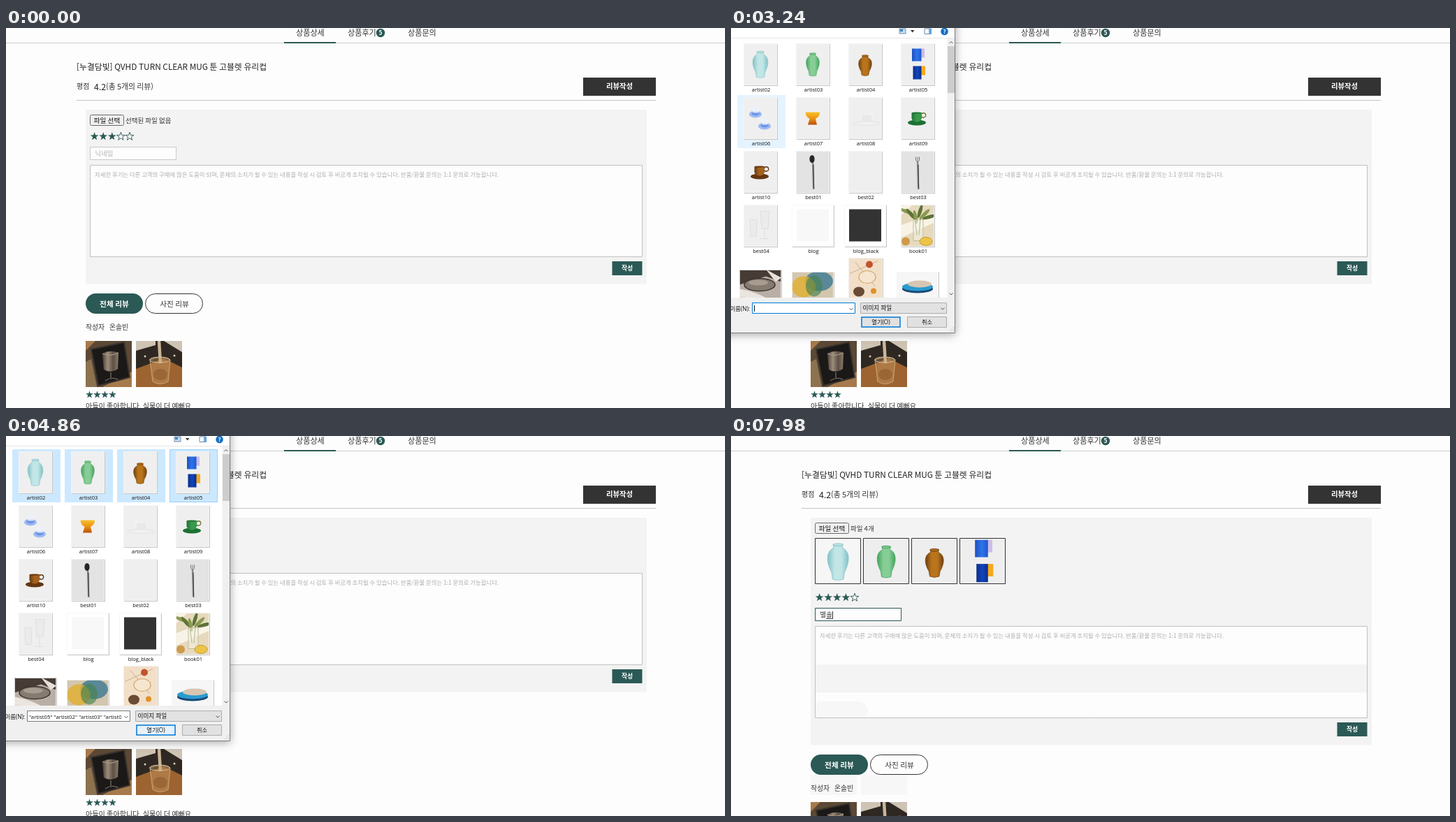
These frames come from a looping animation (1029x544 px, 8000 ms). An HTML page with a canvas:

```html
<!DOCTYPE html>
<html lang="ko">
<head>
<meta charset="utf-8">
<style>
  html, body { margin: 0; width: 100%; height: 100%; overflow: hidden; background: #fdfdfd; }
  canvas { display: block; }
</style>
</head>
<body>
<canvas id="stage" width="1029" height="544"></canvas>
<script>
const LOOP = 8000, W = 1029, H = 544;
const GREEN = '#2b5955', INK = '#333', PAGE = '#fdfdfd';
const UI = '"Open Sans", "Noto Sans CJK KR", sans-serif';
const BODY = '"Noto Sans CJK KR", "Noto Sans CJK", sans-serif';

const stage = document.getElementById('stage').getContext('2d');
const layerCanvas = Object.assign(document.createElement('canvas'), { width: 360, height: 480 });
const layer = layerCanvas.getContext('2d');
let g = stage;

// Value of the last [time, value] step that has been reached.
const step = (t, steps) => steps.reduce((v, [at, next]) => t >= at ? next : v, steps[0][1]);

function box(x, y, w, h, fill, stroke, r = 0, lw = 1) {
  g.beginPath();
  g.roundRect(x, y, w, h, r);
  paint(fill, stroke, lw);
}
function oval(x, y, rx, ry, fill, stroke, lw = 1, turn = 0) {
  g.beginPath();
  g.ellipse(x, y, rx, ry, turn, 0, 7);
  paint(fill, stroke, lw);
}
function paint(fill, stroke, lw) {
  if (fill) { g.fillStyle = fill; g.fill(); }
  if (stroke) { g.strokeStyle = stroke; g.lineWidth = lw; g.stroke(); }
}
function shape(d, fill, stroke, lw = 1) {
  const p = new Path2D(d);
  if (fill) { g.fillStyle = fill; g.fill(p); }
  if (stroke) { g.strokeStyle = stroke; g.lineWidth = lw; g.stroke(p); }
}
function blend(x1, y1, x2, y2, ...colors) {
  const fill = g.createLinearGradient(x1, y1, x2, y2);
  colors.forEach((c, i) => fill.addColorStop(i / (colors.length - 1), c));
  return fill;
}
function text(s, x, y, size, color = INK, weight = 400, align = 'left', family = BODY) {
  g.font = `${weight} ${size}px ${family}`;
  g.textAlign = align;
  g.fillStyle = color;
  g.fillText(s, x, y + size * .37);
}
const ui = (s, x, y, size = 8.2, align = 'left', color = '#111') => text(s, x, y, size, color, 400, align, UI);

function within(x, y, w, h, draw) {
  g.save();
  g.beginPath();
  g.rect(x, y, w, h);
  g.clip();
  draw();
  g.restore();
}
function at(x, y, scale, draw) {
  g.save();
  g.translate(x, y);
  g.scale(scale, scale);
  draw();
  g.restore();
}
function stars(x, y, pitch, radius, full, total) {
  for (let i = 0; i < total; i++) {
    g.beginPath();
    for (let k = 0; k < 10; k++) {
      const r = k % 2 ? radius * .4 : radius, a = k * Math.PI / 5;
      g.lineTo(x + i * pitch + r * Math.sin(a), y - r * Math.cos(a));
    }
    g.closePath();
    paint(i < full && GREEN, i >= full && GREEN, .9);
  }
}

// Pictures, drawn around their own centre.
function vase(halfWidth, top, bottom, light, dark) {
  const h = bottom - top, w = halfWidth, n = w * .45;
  shape(`M${-n},${top} H${n} V${top + h * .1} C${w * 1.25},${top + h * .2} ${w * 1.2},${top + h * .5}
    ${w * .66},${top + h * .78} L${w * .55},${bottom - 1} Q0,${bottom + 1} ${-w * .55},${bottom - 1}
    L${-w * .66},${top + h * .78} C${-w * 1.2},${top + h * .5} ${-w * 1.25},${top + h * .2}
    ${-n},${top + h * .1}Z`, blend(-w, 0, w, 0, dark, light, light, dark), dark, .5);
  oval(0, top + .5, n + .6, 1.2, light, dark, .8);
}
function mugs() {
  box(5, -22, 5, 13, '#cdbbea');
  box(-8, -22, 13.5, 18, blend(-8, 0, 6, 0, '#1c50c0', '#2f74ea', '#1f55cc'));
  box(5, 3, 6, 13, '#f5a91c');
  box(-6.5, 3, 12, 19, blend(-7, 0, 6, 0, '#0a2a86', '#1246bb', '#0a2a86'));
}
function cup(color, dark, ring) {
  oval(-1, 7, 13, 4, dark);
  oval(8.5, -3.5, 3.2, 3.2, null, ring, 1.4);
  shape('M-8.5,-7 H6 V1 Q4,6 -1,6 Q-7,6 -8.5,1Z', blend(-9, 0, 6, 0, dark, color, color));
  oval(-1.2, -7, 7.3, .9, dark);
}
function saucers() {
  for (const [x, y] of [[-7, -5], [6, 12]]) {
    oval(x, y, 9, 5, '#9dbaf2');
    oval(x, y - 1, 5.5, 3, '#6d95e6');
    box(x - 4, y - 11, 9, 9, 'rgba(236,241,251,.85)', null, 2);
  }
}
function goblet() {
  shape('M-10.5,-8 H10 Q10,-1 4,1.5 L6,10 H-7 L-4.5,1.5 Q-10,-1 -10.5,-8Z', blend(0, -8, 0, 10, '#f8c02c', '#ec9412', '#b9500c'));
}
function faintCup() {
  box(-6, -5, 16, 12, '#e9e9e9', '#f8f8f8', 3);
  oval(1, 8, 20, 3, null, '#e6e6e6');
}
function cutlery(fork) {
  box(-24, -30, 48, 60, '#e3e3e4');
  shape('M0,-14 L1,25', null, '#8a8a8a', 2.4);
  shape('M1,-10 L1.7,25', null, '#222', .9);
  if (fork) shape('M-2.5,-21 V-16 Q0,-12 2.5,-16 V-21 M0,-21 V-13', null, '#777', 1);
  else oval(-1, -18, 3.6, 5.5, '#262626');
}
function glasses() {
  shape('M-15,-8 H-5 L-6,16 H-14Z M0,-20 H13 L11,5 H2Z M6,5 V19 M0,19 H12', '#ebebeb', '#dfdfdf');
}
function bouquet() {
  box(-24, -30, 48, 60, '#e6d9bd');
  shape('M-24,0 L24,-18 V-4 L-24,18Z', '#f8f3e6');
  shape('M-24,-30 H-6 L-24,-14Z', '#f8f3e6');
  for (let i = 0; i < 6; i++) oval(-16 + i * 6.5, -20 + i % 3 * 4, 2.6, 10, i % 2 ? '#5d7337' : '#8b9a52', null, 1, i * .5 - 1.2);
  shape('M-4,-10 L-1,14 M4,-10 L2,14', null, '#75854a', 1.2);
  box(-6, -8, 14, 30, 'rgba(245,245,230,.55)', '#c3bc9c');
  oval(-17, 23, 6, 6, '#cf9a4c');
  oval(12, 23, 9, 6, '#edc44a', '#c49a26');
}
function teapot() {
  box(-30, -14, 60, 44, '#b9afa6');
  shape('M-30,-14 H30 V4 L8,-4 L-30,8Z', '#463b35');
  shape('M8,-14 L30,-2 L22,4Z', '#e5e0da');
  oval(-1, 8, 22, 9, '#857b71', '#3b332d', 1.5);
  oval(-3, 5, 14, 4, '#a89c90');
  shape('M-30,26 V14 Q-6,18 10,28Z', '#ebe5df');
}
function coloredGlass() {
  box(-30, -11, 60, 41, '#d3c6ae');
  oval(9, 3, 20, 14, 'rgba(50,115,145,.75)');
  oval(-13, 11, 17, 15, 'rgba(225,175,45,.8)');
  oval(2, 10, 12, 15, 'rgba(70,130,80,.65)');
}
function plates() {
  box(-25, -31, 50, 61, '#f1dfc8');
  shape('M-22,-8 L18,-26 M-14,-24 L14,10', null, '#c4a27a', .8);
  oval(3, -3, 12, 9, '#f5e6d0', '#d6a266', 1.2);
  oval(6, -21, 5, 5, '#c0542e');
  oval(-9, 18, 8, 7, '#6a4b33');
  oval(12, 17, 4, 4, '#dd9228');
}
function plateStack() {
  box(-30, -11, 60, 41, '#f6f6f6');
  oval(0, 14, 22, 6, '#164a75');
  oval(0, 11, 22, 6, '#2a9bd0');
  oval(3, 7, 17, 5, '#d8c6b2');
}
const vases = [
  () => vase(10.3, -17.5, 20, '#c2e5e6', '#86c4c8'),
  () => vase(8.9, -15, 17.5, '#86ce96', '#4ba563'),
  () => vase(8.9, -12, 17, '#b9741c', '#754410'),
  mugs
];
const files = [
  ...vases.map((art, i) => ['artist0' + (i + 2), art]),
  ['artist06', saucers], ['artist07', goblet], ['artist08', faintCup],
  ['artist09', () => cup('#3a9a4c', '#1d7034', '#6d7a2d')],
  ['artist10', () => cup('#a5621f', '#643610', '#5d3a1c')],
  ['best01', () => cutlery(false)], ['best02', () => {}], ['best03', () => cutlery(true)],
  ['best04', glasses],
  ['blog', () => box(-23, -23, 46, 46, '#f8f8f8')],
  ['blog_black', () => box(-23, -23, 46, 46, INK)],
  ['book01', bouquet],
  ['', teapot, 60, 44], ['', coloredGlass, 60, 41], ['', plates, 49, 61], ['', plateStack, 60, 41]
];

function photo(x, y, draw) {
  within(x, y, 66, 66, () => at(x, y, 1, draw));
}
function boxedGlass() {
  box(0, 0, 66, 66, '#a67a4c');
  shape('M0,14 L14,0 H66 V44 L24,66 H0Z', '#5b4936');
  shape('M8,12 L55,2 L63,52 L18,64Z', '#1b1917', '#39332d', 2);
  shape('M0,30 L8,26 L16,66 H0Z', '#8d7250');
  shape('M24,18 Q35,12 47,17 L46,40 Q36,47 26,41Z', blend(24, 0, 47, 0, '#4b4037', '#9c8d7b', '#5c5046', '#8b7c6b'));
  shape('M24,18 Q35,23 47,17', null, '#b0a08d');
  shape('M36,45 V53 M28,57 Q37,51 46,55', null, '#6d665d', 1.4);
}
function strawGlass() {
  box(0, 0, 66, 66, '#9d6431');
  shape('M0,0 H66 V38 L40,25 L0,40Z', '#2f2822');
  shape('M0,0 H28 V6 L0,14Z M40,0 H66 V16Z', '#cfc3b4');
  oval(13, 22, 1.5, 1.5, '#d8cbb9');
  oval(55, 21, 1.5, 1.5, '#d8cbb9');
  shape('M33,0 L35,32', null, '#c9b59c', 4.5);
  shape('M20,27 Q34,20 49,27 L46,58 Q34,65 24,58Z', 'rgba(205,160,105,.35)', '#c9a878');
  oval(34, 27, 14.5, 4, null, '#d5bf9c');
  oval(35, 48, 10, 8, 'rgba(110,60,20,.3)');
}

function nickname(t, y) {
  const focused = t >= 6600;
  box(120.5, y + .5, 123, 18, PAGE, focused ? GREEN : '#c8c8c8');
  const typed = step(t, [[0, ''], [7320, 'ㅂ'], [7620, '벼'], [7740, '별'], [7800, '별ㅅ'], [7920, '별소'], [7980, '별솔']]);
  text(typed || '닉네임', 127.5, y + 10, 9.4, typed ? INK : '#b2b2b2');
  if (typed) {
    const syllable = g.measureText(typed.at(-1)).width, end = 127.5 + g.measureText(typed).width;
    box(end - syllable, y + 15, syllable, 1, INK);
    box(Math.round(end), y + 5, 1, 11, INK);
  } else if (focused && t < 7140) box(128, y + 4, 1, 11, INK);
}

function page(t) {
  const loaded = t >= 5400, dy = loaded ? 76 : 0;
  box(0, 0, W, H, PAGE);
  box(0, 21, W, 1, '#c9cccb');
  box(398, 20, 74, 2, GREEN);
  text('상품상세', 415, 7, 11.1);
  text('상품후기', 489, 7, 11.1);
  oval(536, 7, 6.2, 6.2, GREEN);
  text('5', 536, 7.2, 8.5, '#fff', 700, 'center');
  text('상품문의', 575, 7, 11.1);

  text('[누결담빛] QVHD TURN CLEAR MUG 툰 고블렛 유리컵', 101, 56, 11.83, '#222', 500);
  text('평점', 101, 83.5, 10);
  text('4.2', 126, 84, 12.4, '#222', 500);
  text('(총 5개의 리뷰)', 143, 84.5, 10.8);
  box(826, 71, 104, 26, INK);
  text('리뷰작성', 878, 83.5, 10.4, '#fff', 700, 'center');
  box(101, 103, 829, 1, '#c4c4c4');

  box(114, 117, 803, 249.5 + dy, '#f3f3f3');
  const hovered = t >= 720 && t < 5340;
  box(120.5, 124.5, 48, 15, hovered ? '#e2e2e2' : '#efefef', hovered ? '#4f4f4f' : '#6b6b6b', 2);
  text('파일 선택', 144.5, 132, 9.6, '#111', 400, 'center');
  text(t >= 5340 ? '파일 4개' : '선택된 파일 없음', 171, 132, 9.5);
  if (loaded) vases.forEach((art, i) => {
    const x = 120.5 + 69 * i;
    box(x, 146.5, 65, 65, i ? '#eeeeee' : '#f6f6f6', INK);
    within(x + .5, 147, 64, 64, () => at(x + 32.7, 179, 1.375, art));
  });
  stars(126.6, 155.3 + dy, 12.6, 6.2, step(t, [[0, 3], [5760, 5], [5880, 4]]), 5);
  nickname(t, 170 + dy);
  box(120.5, 196.5 + dy, 790, 131, PAGE, '#c0c0c0');
  // Faint leftovers of the earlier layout.
  if (loaded) {
    box(121, 327, 789, 40, '#f4f4f4');
    within(121, 380, 150, 23, () => box(114, 380, 82, 29, '#f7f7f7', null, 14.5));
    box(114, 485, 66, 29, '#f7f7f7');
    box(186, 485, 66, 29, '#f7f7f7');
  }
  text('자세한 후기는 다른 고객의 구매에 많은 도움이 되며, 문제의 소지가 될 수 있는 내용을 작성 시 검토 후 비공개 조치될 수 있습니다. 반품/환불 문의는 1:1 문의로 가능합니다.',
    127, 209.5 + dy, 8.37, '#adadad');
  box(867.5, 334 + dy, 43, 20, GREEN);
  text('작성', 889, 344 + dy, 8.8, '#fff', 700, 'center');

  box(114, 380 + dy, 82, 29, GREEN, null, 14.5);
  text('전체 리뷰', 155, 395 + dy, 10.7, '#fff', 700, 'center');
  box(199.5, 380.5 + dy, 82, 28, PAGE, INK, 14);
  text('사진 리뷰', 241, 395 + dy, 10.7, INK, 500, 'center');
  text('작성자', 114, 428 + dy, 9.8);
  text('온솔빈', 148, 428 + dy, 9.8);
  photo(114, 448 + dy, boxedGlass);
  photo(186, 448 + dy, strawGlass);
  stars(119.5, 525 + dy, 11, 5.6, 4, 4);
  text('아들이 좋아합니다. 실물이 더 예뻐요', 114, 541.5 + dy, 10.1);
}

function fileGrid(t) {
  const hover = step(t, [[0, -1], [3240, 4], [3360, 0], [3660, 1], [3780, 2], [3960, 3], [4260, 7], [4320, 15], [4380, 19], [4620, -1]]);
  const selected = step(t, [[0, 0], [3540, 1], [4080, 4]]);
  files.forEach(([name, art, w = name.startsWith('blog') ? 60 : 48, h = 60], i) => {
    const left = 9 + i % 4 * 75, top = 19 + (i >> 2) * 77, cx = left + 33;
    if (i < selected) {
      const idle = t >= 4920;
      box(left, top, 69, 76, idle ? '#d9d9d9' : '#cce8ff');
      if (!idle && i === selected - 1) box(left + .5, top + .5, 68, 75, null, '#99d1ff');
    } else if (i === hover) box(left, top, 69, 76, '#e5f3ff');
    const x = Math.round(cx - w / 2), y = top + 63 - h;
    box(x + 1, y + 1, w, h, '#c6c6c6');
    box(x, y, w, h, w === 60 ? '#fff' : '#efefef');
    within(x, y, w, h, () => at(cx, top + 32.5, 1, art));
    box(x + .5, y + .5, w - 1, h - 1, null, 'rgba(245,245,245,.8)');
    ui(name, cx + 1, top + 69.5, 7.5, 'center');
  });
}

const chevron = (x, y, dir = 1) => shape(`M${x - 2.5},${y - dir} L${x},${y + 1.5 * dir} L${x + 2.5},${y - dir}`, null, '#555');

function toolbar() {
  box(241, 1, 9, 7, '#c5dcf0', '#7590aa');
  box(242, 2, 4, 3, '#3c82c4');
  shape('M257,3 H262.5 L259.7,6.5Z', INK);
  box(277, 1, 9.5, 7.5, '#fff', '#6b8cab');
  box(283, 1, 3.5, 7.5, '#69a9df');
  oval(305.5, 5, 5.3, 5.3, '#1670c4');
  text('?', 305.5, 5, 8, '#fff', 700, 'center');
}

function scrollbar() {
  box(309.5, 15, 11, 371, '#f0f0f0');
  box(310, 26, 10, 67, '#cdcdcd');
  chevron(315, 21, -1);
  chevron(315, 380.5);
}

function fileName(t) {
  const name = step(t, [[0, ''], [3540, 'artist02'], [4080, '"artist05" "artist02" "artist03" "artist04"']]);
  if (t < 3540) box(33, 397, 1, 9, '#111');
  within(32, 395, 133, 13, () => {
    if (t < 4920) return ui(name, 33, 401.8, 7.8);
    box(32, 395, 133, 13, '#0078d7');
    ui(name, 164, 401.8, 7.8, 'right', '#fff');
  });
}

function footer(t) {
  const ready = t >= 3060;
  box(-10, 386, 331, 50, '#f0f0f0');
  box(30.5, 393.5, 147, 15, '#fff', ready && (t < 3540 || t >= 4920 ? '#0078d7' : '#7a7a7a'));
  if (!ready) {
    box(186, 394, 123, 15, '#fafafa');
    box(186, 413, 57, 16, '#fafafa');
    box(252, 413, 57, 16, '#fafafa');
    return;
  }
  ui('파일 이름(N):', 27, 401.5, 8.2, 'right');
  chevron(172, 402);
  fileName(t);
  box(185.5, 393.5, 123, 15, '#e2e2e2', '#adadad');
  ui('이미지 파일', 188.5, 401.3, 8.6);
  chevron(303, 401.5);
  const glow = Math.max(0, Math.min(1, (t - 4560) / 240));
  box(187, 414, 55, 14, `rgb(${225 + 4 * glow},${225 + 16 * glow},${225 + 26 * glow})`, '#0078d7', 0, 1.5);
  ui('열기(O)', 214.5, 421, 8.2, 'center');
  box(252.5, 413.5, 56, 15, '#e1e1e1', '#adadad');
  ui('취소', 280.5, 421, 8.2, 'center');
  for (let i = 0; i < 3; i++) for (let k = 0; k <= i; k++) box(318 - k * 2.5, 428 + i * 2.5, 1, 1, '#b0b0b0');
}

function dialog(t) {
  const [alpha, scale] = step(t, [[0, [0, 1]], [2400, [.6, .978]], [2460, [.83, .99]], [2520, [.95, .997]], [2580, [1, 1]],
    [5040, [.52, .978]], [5100, [.2, .965]], [5160, [0, 1]]]);
  if (!alpha) return;
  g = layer;
  g.clearRect(0, 0, 360, 480);
  // The window reaches past the stage, so it scales around its own centre.
  g.save();
  g.translate(87 * (1 - scale), 176 * (1 - scale));
  g.scale(scale, scale);
  g.shadowColor = 'rgba(0,0,0,.35)';
  g.shadowBlur = 12;
  g.shadowOffsetY = 3;
  box(-149, -92, 470, 528, '#fff');
  g.shadowColor = 'transparent';
  if (t >= 2880) {
    within(-10, 15, 331, 371, () => fileGrid(t));
    scrollbar();
    toolbar();
    box(-10, 14, 331, 1, '#e6e6e6');
  }
  footer(t);
  box(-149.5, -92.5, 470, 529, null, '#7d7d7d');
  g.restore();
  g = stage;
  g.globalAlpha = alpha;
  g.drawImage(layerCanvas, 0, 0);
  g.globalAlpha = 1;
}

function frame() {
  const t = performance.now() % LOOP;
  page(t);
  dialog(t);
  requestAnimationFrame(frame);
}
frame();
</script>
</body>
</html>
```
